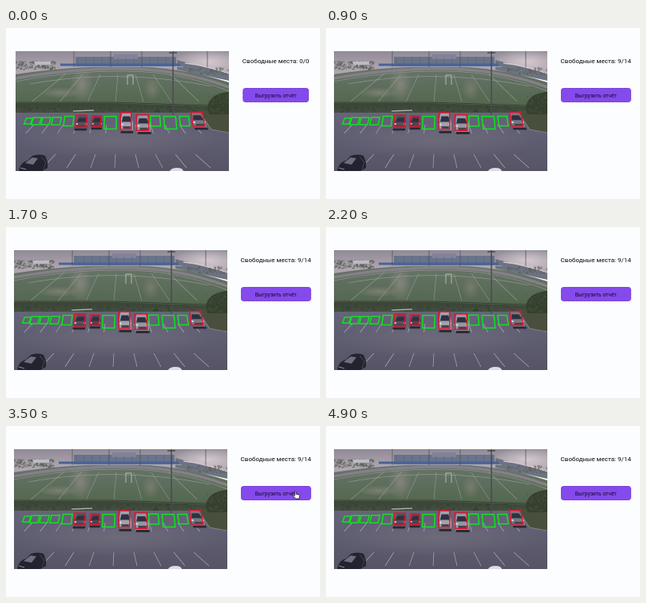
These frames come from a looping animation (393x214 px, 5 s). An HTML page with a canvas:

```html
<!DOCTYPE html>
<html lang="ru">
<head>
<meta charset="utf-8">
<title>Парковка</title>
<style>
html, body { margin: 0; width: 100%; height: 100%; overflow: hidden; background: #fcfdff; }
#stage { position: relative; width: 393px; height: 214px; overflow: hidden; }
#view { position: absolute; left: 10px; top: 29px; width: 267px; height: 150px; }
#panel { position: absolute; left: 337.7px; top: 36px; transform: translateX(-50%); white-space: nowrap; color: #080808; font: 8px/11px Roboto, sans-serif; }
#export { box-sizing: border-box; height: 18px; margin-top: 28px; border: 1px dashed #7745d2; border-radius: 4px; background: #854aeb; color: #160a2c; font: 6.67px/18px Roboto, sans-serif; text-align: center; }
#over { position: absolute; left: 0; top: 0; }
</style>
</head>
<body>
<div id="stage">
  <canvas id="view"></canvas>
  <div id="panel">
    <div id="count"></div>
    <div id="export">Выгрузить отчёт</div>
  </div>
  <svg id="over" width="393" height="214">
    <g id="trail" fill="#d9c9f5" opacity=".75">
      <path d="M315 80l2 1 2-1-1 2 1 2-2-1-2 1 1-2z"/>
      <path d="M331 82l2 1 2-1-1 2 1 2-2-1-2 1 1-2z"/>
      <path d="M344 82l2 1 2-1-1 2 1 2-2-1-2 1 1-2z"/>
    </g>
    <g id="cursor" fill="#fff" stroke="#151515" stroke-width=".8" stroke-linejoin="round">
      <path id="arrow" d="M0 0v8l2-1.8 1.4 3 1.4-.7-1.3-2.8h2.6z"/>
      <path id="hand" d="M0 0q1-.9 1.6.2v3l3.6.8q1 .3.9 1.4L5.4 9H1L-2 5.6q-.2-1.4 1.1-1L0 5.3z"/>
    </g>
  </svg>
</div>
<script>
const $ = id => document.getElementById(id);
const view = $('view');
const scale = Math.max(2, window.devicePixelRatio || 1);
view.width = 267 * scale;
view.height = 150 * scale;
const c = view.getContext('2d');
c.scale(scale, scale);
c.translate(-10, -29);

let seed = 7;
const rnd = () => (seed = seed * 16807 % 2147483647) / 2147483647;

function rect(x, y, w, h, color) {
  c.fillStyle = color;
  c.fillRect(x, y, w, h);
}
function fill(color, d) {
  c.fillStyle = color;
  c.fill(new Path2D(d));
}
function line(color, w, d) {
  c.strokeStyle = color;
  c.lineWidth = w;
  c.stroke(new Path2D(d));
}
function fade(y, h, top, bottom) {
  const g = c.createLinearGradient(0, y, 0, y + h);
  g.addColorStop(0, top);
  g.addColorStop(1, bottom);
  return g;
}
function haze(x, y, rx, ry, color) {
  c.save();
  c.translate(x, y);
  c.scale(rx, ry);
  const g = c.createRadialGradient(0, 0, 0, 0, 0, 1);
  g.addColorStop(0, color + 'b0');
  g.addColorStop(1, color + '00');
  rect(-1, -1, 2, 2, g);
  c.restore();
}
function leaves(x, y, w, h, n, color) {
  c.globalAlpha = .5;
  for (let i = 0; i < n; i++) {
    const r = .8 + rnd() * 1.6;
    rect(x + rnd() * w, y + rnd() * h, r, r, color);
  }
  c.globalAlpha = 1;
}

function sky() {
  rect(10, 29, 267, 30, fade(29, 22, '#918b98', '#aea5ae'));
  haze(252, 42, 44, 16, '#ecdfe2');
  leaves(10, 41, 50, 10, 150, '#4b5549');
  rect(34, 42, 20, 4, '#bcbbc3');
  fill('#6d7380', 'M212 40L277 57V66L212 52z');
  line('#d8ccd0', 1.2, 'M222 44Q250 47 277 57');
  leaves(225, 49, 52, 9, 70, '#565d55');
}

function field() {
  const edge = 'M10 58Q75 48 145 48T277 68';
  fill(fade(48, 56, '#68756a', '#50654a'), edge + 'V107H10z');
  line('#858088', 3.5, 'M10 63Q75 51 145 51T277 74');
  line('#a29f9f', .6, 'M10 67Q75 54 145 54T277 79');
  const chalk = 'rgba(200,208,198,.5)';
  for (let x = 72; x < 216; x += 22) line(chalk, .6, `M${x} 58L${x + (x - 143) * .58} 92`);
  line(chalk, .6, 'M28 70Q140 50 255 73');
  line('#d6d7d5', .7, 'M150 71V59H157V71');
  haze(93, 71, 15, 23, '#95908a');
  haze(66, 81, 26, 7, '#8e897f');
  haze(181, 76, 11, 15, '#858377');
}

function stands() {
  rect(85, 36, 126, 12, '#69738a');
  rect(133, 33, 30, 6, '#81839a');
  for (let x = 88; x < 212; x += 10) line('#55627f', .5, `M${x} 37v11`);
  rect(66, 44.5, 150, 3, '#4a629a');
  line('#a8acb8', .7, 'M66 48.5H220');
  for (const x of [83, 129, 168, 250]) line('#55545e', .8, `M${x} 29v20`);
}

function fence() {
  fill(fade(93, 14, '#3a4337', '#465140'), 'M10 94H130L277 99V109L10 106z');
  leaves(10, 97, 262, 8, 160, '#333b30');
  line('#30352f', .8, 'M10 93H130L252 97');
  line('#b8bab8', 1.2, 'M82 104L108 103');
}

function lot() {
  rect(10, 106, 267, 73, fade(106, 73, '#66647a', '#565465'));
  haze(140, 140, 130, 24, '#74727f');
  fill('#484f3c', 'M240 103H277V131L255 127z');
  line('#8b8a88', .8, 'M240 105L255 127L277 131');
  fill('#36402f', 'M250 100Q252 82 277 80V108H252z');
  leaves(251, 82, 26, 24, 60, '#4a543f');
  const paint = 'rgba(205,205,214,.7)';
  for (let x = 33; x < 250; x += 18.2) line(paint, .7, `M${x} 121l${(x - 138) * .1} 11`);
  for (let x = 60; x < 250; x += 25) line(paint, .7, `M${x} 158l${(x - 140) * .2} 17`);
  fill('#dcdbe2', 'M203 179Q205 175 212 175T220 179z');
  line('#4b4a52', 1.5, 'M207 29V109M202 31H212');
}

// Unit car, drawn in a box of 1 by 1 and sheared outwards by the lens.
function car(x, y, w, h, paint) {
  c.save();
  c.transform(w, 0, -(143 - x) * .0035 * h, h, x, y);
  rect(-.5, .3, 1, .25, '#292831');
  fill(paint, 'M-.5 .42V0L-.33 -.5H.33L.5 0V.42z');
  fill('#2f3140', 'M-.4 -.02L-.28 -.3H.28L.4 -.02z');
  rect(-.3, .2, .6, .12, '#45434d');
  for (const side of [-.46, .3]) rect(side, .07, .16, .08, '#e4dfe2');
  c.restore();
}

function darkCar() {
  fill('#23232f', 'M14 179Q16 168 25 166L31 160Q40 157 47 160L50 168V175L43 179z');
  fill('#6c6f80', 'M22 169L31 162L38 163L32 171z');
  line('#4b4d5c', .8, 'M42 161L48 168L45 177');
  line('#a6a8b4', .8, 'M16 175L23 177');
}

// Box centre and width for each place, then height ratio and paint of the parked cars.
const places = [[26, 8], [36, 10], [48, 10], [61, 10.5], [76.5, 11.5], [92, 13.5], [111, 11.5], [128.5, 15], [148, 13.5], [169, 15], [185, 12], [203.5, 15], [221.5, 11.5], [238, 14.4]];
const parked = { 5: [1.1, '#55505c'], 6: [1.1, '#51434e'], 8: [1.55, '#a4a1ad'], 9: [1.3, '#9896a2'], 13: [1.2, '#77767f'] };

function parking() {
  places.forEach(([x, w], i) => {
    const [ratio, paint] = parked[i] || [w > 11 ? 1.05 : .9];
    const h = w * ratio;
    const y = 116.5 + (w > 14.5 ? 2 : 0) - Math.max(0, x - 225) * .18;
    const lean = (143 - x) * .012;
    if (paint) car(x + 1, y + 1.5, w + 2, h + 4, paint);
    line(paint ? '#e0142f' : '#0de51c', 1.5,
      `M${x - w / 2 + lean} ${y - h / 2}h${w}l${-lean * 2} ${h}h${-w}z`);
  });
}

[sky, field, stands, fence, lot, darkCar, parking].forEach(paint => paint());

// time, x, y of the pointer tip
const path = [[2800, 391, 200], [3300, 361.5, 82], [3800, 361.5, 82], [4300, 304, 79]];
const show = (id, on) => $(id).style.display = on ? '' : 'none';

function pointer(t) {
  const i = path.findIndex(p => p[0] > t);
  const [t0, x0, y0] = path[i - 1], [t1, x1, y1] = path[i];
  const k = (t - t0) / (t1 - t0), e = k * k * (3 - 2 * k);
  return [x0 + (x1 - x0) * e, y0 + (y1 - y0) * e];
}

function draw(now) {
  const t = Math.floor(now % 5000 / 100) * 100;
  const ready = t >= 400;
  $('count').textContent = 'Свободные места: ' + (ready ? '9/14' : '0/0');
  view.style.left = ready ? '10px' : '12.4px';

  const active = t >= 2800 && t < 4300;
  show('cursor', active);
  if (active) {
    const [x, y] = pointer(t);
    const over = y > 75 && y < 93;
    show('hand', over);
    show('arrow', !over);
    $('cursor').setAttribute('transform', `translate(${x} ${y})`);
  }
  show('trail', t >= 4300 && t < 4700);
}

const start = performance.now();
function tick() {
  draw(performance.now() - start);
  requestAnimationFrame(tick);
}
tick();
</script>
</body>
</html>
```
